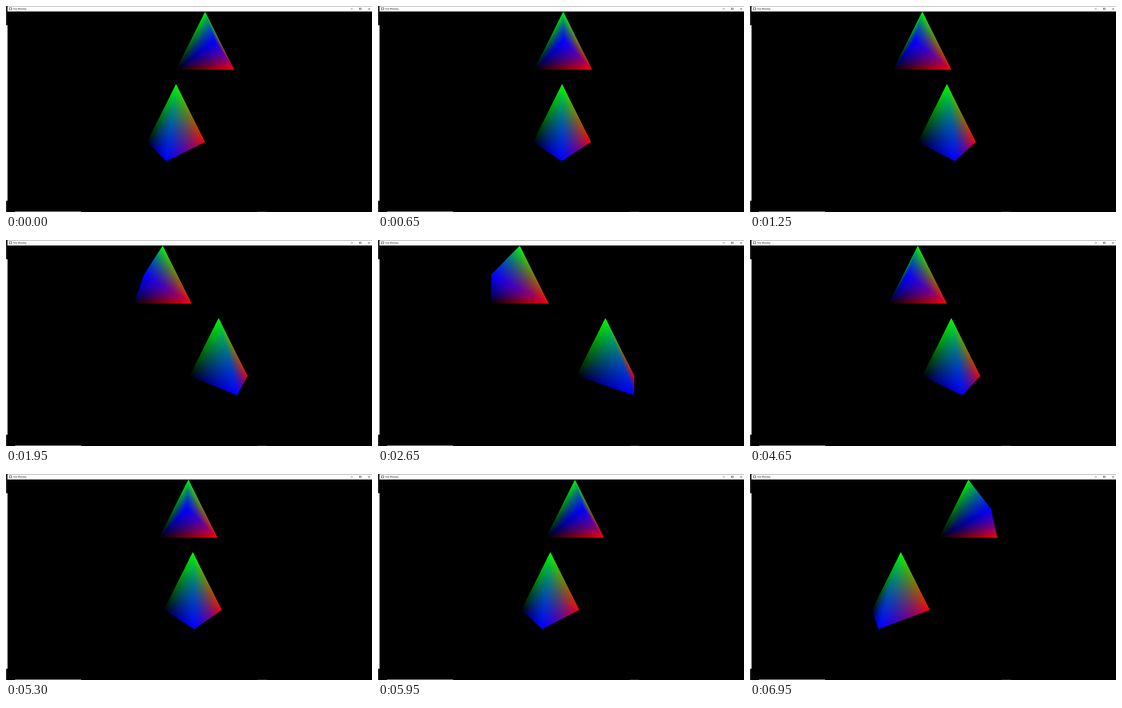
An HTML page with a canvas that plays this animation: 600x338 px, repeating every 7000 ms.

```html
<!DOCTYPE html>
<html lang="en">
<head>
<meta charset="utf-8">
<title>Test Window</title>
<style>
  html, body { margin: 0; width: 100%; height: 100%; overflow: hidden; background: #000; }
  canvas, svg { position: absolute; left: 0; top: 0; width: 600px; height: 338px; }
  text { font: 3.7px "Open Sans", "Noto Sans", sans-serif; }
</style>
</head>
<body>
<canvas id="scene" width="1200" height="676"></canvas>
<svg viewBox="0 0 600 338">
  <path fill="#222" d="M0 0h2v32H0zM0 319h2v19H0z"/>
  <path fill="#fff" d="M2.5 1H600v8H2.5zM0 31.5h2.5v288H0z"/>
  <path fill="#aaa" d="M2.5 0H600v1H2.5zM15 337h108v1H15z"/>
  <path fill="#333" d="M413 337h15v1h-15z"/>
  <rect x="5.5" y="2.9" width="4" height="3.6" fill="#eee" stroke="#555" stroke-width=".8"/>
  <text x="11.7" y="6.2">Test Window</text>
  <g fill="none" stroke="#222" stroke-width=".6">
    <path d="M565.3 4.8h3.2M593.8 3.2l3 3m0-3l-3 3"/>
    <rect x="579.3" y="3.3" width="2.8" height="2.8"/>
  </g>
</svg>
<script>
const LOOP = 7000, STEP = 50;
const SCALE = 2;                       // supersampling
const CX = 302.6, CY = 175.5, UNIT = 118.75, DIST = 2.5;

// Tetrahedron: black left, blue front, red right, green apex
const verts = [[-1, -1, 0], [0, -1, 1], [1, -1, 0], [0, 1, 0]];
const faces = [[0, 3, 1], [1, 3, 2], [2, 3, 0], [0, 1, 2]];

// Sideways offset in pixels: steady travel that turns round at the far end
const path = [[0, -23.75], [1250, 20.1], [2250, 56.8], [2650, 70.2], [3025, 83.7],
              [3850, 54.1], [4650, 27.4], [5950, -20.2], [6950, -55.3]];

const canvas = document.getElementById("scene");
const ctx = canvas.getContext("2d");
const W = canvas.width, H = canvas.height;
const image = ctx.createImageData(W, H);
const pixels = new Uint32Array(image.data.buffer);
const depth = new Float32Array(W * H);

function offsetAt(t) {
  let i = 1;
  while (t > path[i][0]) i++;
  const [t0, a] = path[i - 1], [t1, b] = path[i];
  return a + (b - a) * (t - t0) / (t1 - t0);
}

function project([x, y, z], dx, dy) {
  const near = DIST / (DIST - z);
  return {
    x: (CX + (0.4 * x + dx) * UNIT * near) * SCALE,
    y: (CY - (0.4 * y + dy) * UNIT * near) * SCALE,
    near,
    color: [x, y, z].map(v => Math.max(0, v) * 255)
  };
}

const edge = (a, b, x, y) => (b.x - a.x) * (y - a.y) - (b.y - a.y) * (x - a.x);

// Depth-tested triangle with perspective-correct colours
function fill(a, b, c) {
  const area = edge(a, b, c.x, c.y);
  if (Math.abs(area) < 1e-6) return;
  const xs = [a.x, b.x, c.x], ys = [a.y, b.y, c.y];
  const x0 = Math.max(0, Math.floor(Math.min(...xs))), x1 = Math.min(W, Math.ceil(Math.max(...xs)));
  const y0 = Math.max(0, Math.floor(Math.min(...ys))), y1 = Math.min(H, Math.ceil(Math.max(...ys)));
  for (let y = y0; y < y1; y++) {
    for (let x = x0; x < x1; x++) {
      let u = edge(b, c, x + 0.5, y + 0.5) / area;
      let v = edge(c, a, x + 0.5, y + 0.5) / area;
      let w = 1 - u - v;
      if (u < 0 || v < 0 || w < 0) continue;
      u *= a.near; v *= b.near; w *= c.near;
      const near = u + v + w, i = y * W + x;
      if (near <= depth[i]) continue;
      depth[i] = near;
      const mix = k => Math.round((u * a.color[k] + v * b.color[k] + w * c.color[k]) / near);
      pixels[i] = 0xff000000 | mix(2) << 16 | mix(1) << 8 | mix(0);
    }
  }
}

function pyramid(dx, dy) {
  const p = verts.map(v => project(v, dx, dy));
  for (const [a, b, c] of faces) fill(p[a], p[b], p[c]);
}

function draw(t) {
  const dx = offsetAt(t) / UNIT;
  pixels.fill(0xff000000);
  depth.fill(0);
  pyramid(dx, 0);
  pyramid(-dx, 1);
  ctx.putImageData(image, 0, 0);
}

const start = performance.now();
let shown = -1;
function frame() {
  const t = Math.floor((performance.now() - start) % LOOP / STEP) * STEP;
  if (t !== shown) draw(shown = t);
  requestAnimationFrame(frame);
}
frame();
</script>
</body>
</html>
```
